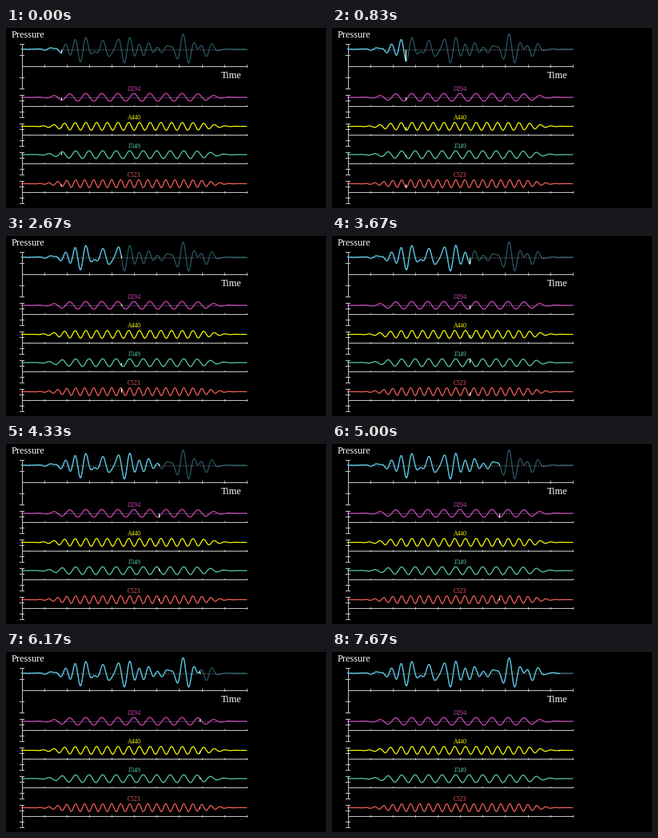
Write a matplotlib script that moves like this. It is 400 px wide and 226 px high and loops after 7840 ms.

```python
import numpy as np
import matplotlib.pyplot as plt
from matplotlib.animation import FuncAnimation

W, H, DPI = 400, 226, 64              # a power of two keeps the pixel size exact
LOOP, FRAMES, STEPS = 7840, 196, 47
INTERVAL = LOOP // FRAMES

X0, UNIT, SPAN = 19.5, 28.125, 10     # time axis: origin, pixels per unit, length
EQ = 1.5                              # equilibrium height in axis units
BIG, SMALL = 14.0, 7.0                # pixels per pressure unit
BLUE, GREY = "#58C4DD", "#C4C4C4"

# label, pitch, colour, pixel row of the time axis
NOTES = [
    ("D294", 294, "#D147BD", 97.5),
    ("A440", 440, "#FFFF00", 134.0),
    ("F349", 349, "#5CD0B3", 169.5),
    ("C523", 523, "#FC6255", 206.0),
]
SUM_ROW, SUM_GAIN = 47.5, 5.3


def px(size):
    return size * 72 / DPI


def smooth(t):
    def sig(v):
        return 1 / (1 + np.exp(-v))
    low = sig(-5)
    return np.clip((sig(10 * (np.clip(t, 0, 1) - 0.5)) - low) / (1 - 2 * low), 0, 1)


def tone(u, pitch):
    fade = smooth(u / 3) * smooth((SPAN - u) / 3)
    return np.cos(2 * np.pi * 2.1 * pitch / 440 * u) * fade


def chord(u):
    return sum(tone(u, pitch) for _, pitch, _, _ in NOTES)


def to_x(u):
    return X0 + UNIT * u


fig = plt.figure(figsize=(W / DPI, H / DPI), dpi=DPI, facecolor="black")
ax = fig.add_axes([0, 0, 1, 1])
ax.set(xlim=(0, W), ylim=(H, 0))
ax.axis("off")


def stroke(x, y, color, width, **kw):
    return ax.plot(x, y, color=color, lw=px(width), **kw)[0]


def draw_axes(row, unit):
    stroke([X0, to_x(SPAN)], [row, row], GREY, 1, zorder=1)
    stroke([X0, X0], [row - 2 * unit, row + 2 * unit], GREY, 1, zorder=1)
    half = unit / 10
    for i in range(1, SPAN + 1):
        stroke([to_x(i)] * 2, [row - half, row + half], GREY, 0.9, zorder=1)
    for j in (-2, -1, 1, 2):
        stroke([X0 - 2.8, X0 + 2.8], [row + j * unit] * 2, GREY, 1, zorder=1)


def draw_rest_line(y):
    stroke([X0, to_x(SPAN)], [y, y], GREY, 0.8, alpha=0.65, zorder=2,
           linestyle=(0, (1.9, 1.9)), dash_capstyle="butt")


def write(x, y, text, size, color="white", ha="left"):
    ax.text(x, y, text, fontsize=px(size), color=color, ha=ha, va="baseline",
            family="Liberation Serif", zorder=5)


u = np.linspace(0, SPAN, 1200)

draw_axes(SUM_ROW, BIG)
sum_rest = SUM_ROW - EQ * BIG
draw_rest_line(sum_rest)
sum_y = sum_rest - SUM_GAIN * chord(u)
stroke(to_x(u), sum_y, BLUE, 1.1, alpha=0.5, zorder=3)
write(6.6, 12.3, "Pressure", 12.2)
write(268.7, 63, "Time", 12.3)

# each marker: wave function, rest level, gain
waves = [(chord, sum_rest, SUM_GAIN)]
for label, pitch, color, row in NOTES:
    draw_axes(row, SMALL)
    rest, gain = row - EQ * SMALL, 0.7 * SMALL
    stroke(to_x(u), rest - gain * tone(u, pitch), color, 1.2, zorder=3)
    write(160.4, row - 18.6, label, 7.6, color, ha="center")
    waves.append((lambda v, p=pitch: tone(v, p), rest, gain))
draw_rest_line(NOTES[0][3] - EQ * SMALL)

trace = stroke([], [], BLUE, 1.3, zorder=4)
markers = [stroke([], [], "white", 1.2, zorder=6, solid_capstyle="butt")
           for _ in waves]


def update(i):
    step = int((i * INTERVAL + INTERVAL - 1) * STEPS / LOOP)
    now = 1.75 + step / 6
    seen = np.append(u[u < now], now)
    trace.set_data(to_x(seen), sum_rest - SUM_GAIN * chord(seen))
    for line, (wave, rest, gain) in zip(markers, waves):
        line.set_data([to_x(now)] * 2, [rest, rest - gain * wave(now)])
    return [trace, *markers]


anim = FuncAnimation(fig, update, frames=FRAMES, interval=INTERVAL,
                     repeat=True, repeat_delay=0, blit=False)
plt.show()
```
